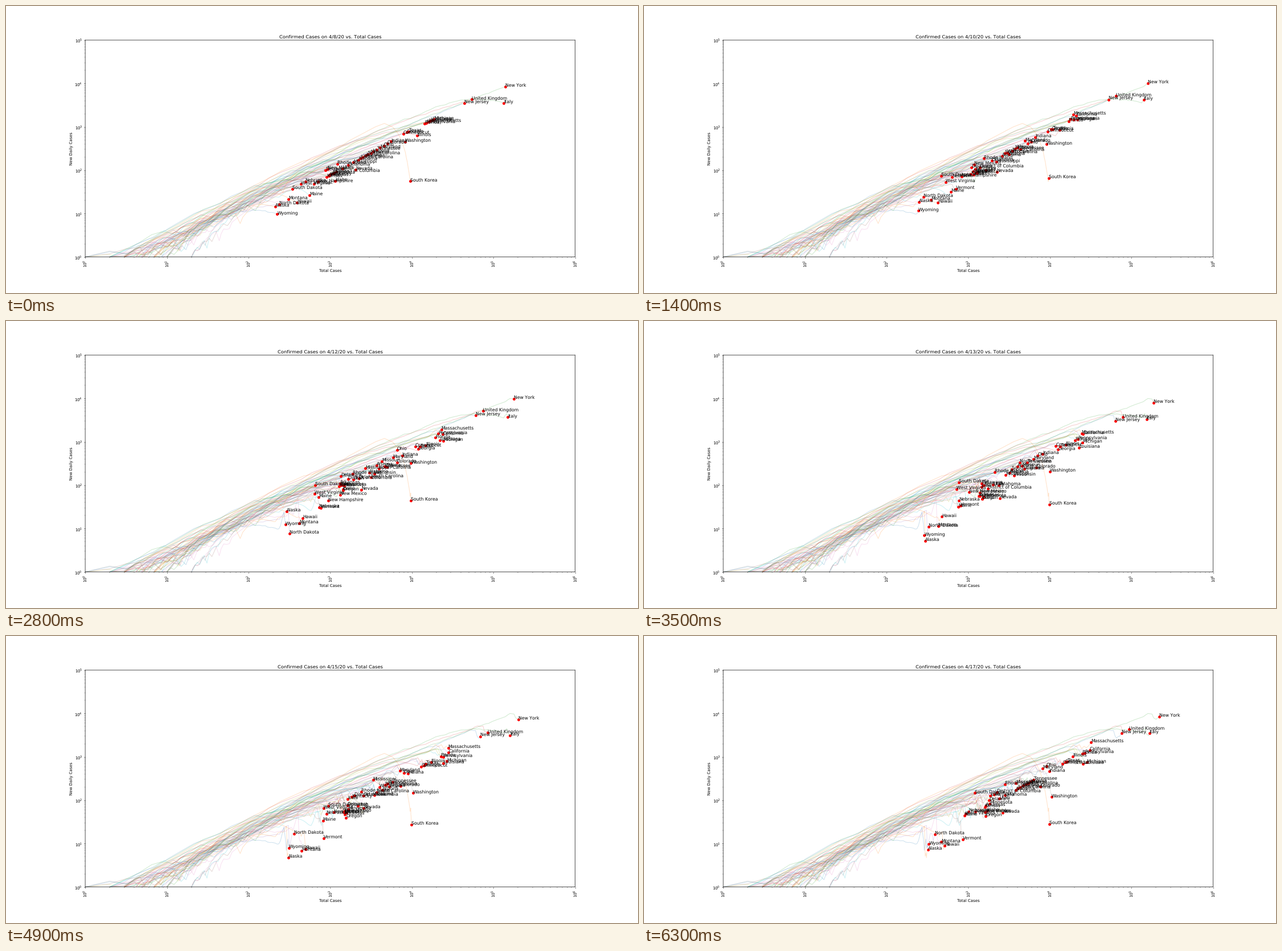
These frames come from a looping animation (1110x505 px, 7000 ms). A matplotlib script:

```python
import numpy as np
import matplotlib.pyplot as plt
from matplotlib.animation import FuncAnimation

W, H, DPI = 1110, 505, 50
N_DAYS, INTERVAL = 10, 700
LEFT, RIGHT, BOTTOM, TOP = 139.1, 999.6, 441.5, 60.0  # plot edges in pixels

plt.rcParams.update({
    "font.family": "DejaVu Sans",
    "font.size": 10.09,
    "text.hinting": "none",
    "text.kerning_factor": 6,
    "axes.linewidth": 1.0,
    "figure.subplot.left": LEFT / W,
    "figure.subplot.right": RIGHT / W,
    "figure.subplot.bottom": 1 - BOTTOM / H,
    "figure.subplot.top": 1 - TOP / H,
})

rng = np.random.default_rng(12)

# Ordered by total cases on the first day.
NAMES = """Alaska, Wyoming, North Dakota, Montana, South Dakota, Hawaii,
West Virginia, Nebraska, Maine, Vermont, New Hampshire, Delaware, Kansas,
New Mexico, Arkansas, Iowa, Kentucky, Minnesota, Oregon, Idaho,
District of Columbia, Rhode Island, Utah, Oklahoma, Mississippi, Nevada,
Alabama, South Carolina, Wisconsin, Arizona, North Carolina, Missouri,
Virginia, Tennessee, Maryland, Ohio, Colorado, Indiana, Connecticut,
Washington, Georgia, Texas, South Korea, Illinois, Florida, Pennsylvania,
Massachusetts, Louisiana, California, Michigan, New Jersey, United Kingdom,
Italy, New York""".replace("\n", " ").split(", ")
ABROAD = ["South Korea", "Italy", "United Kingdom"]
COLOR_ORDER = sorted(set(NAMES) - set(ABROAD)) + ABROAD

# Decades above or below the common trend on the first day.
LEVEL = {
    0.17: "South Dakota, West Virginia, Nebraska, Delaware, New Mexico, Rhode Island",
    -0.2: "Wyoming, Hawaii, Maine, Idaho, Nevada, Washington, Illinois",
    -0.36: "Italy",
    -1.17: "South Korea",
}
# Change of the daily count over the loop, in decades.
CHANGE = {
    0.6: "South Dakota",
    0.22: "Illinois, Iowa, Kentucky, Maine, Maryland, Massachusetts, "
          "Mississippi, Ohio, Rhode Island, District of Columbia",
    -0.3: "Alaska, Hawaii, Montana, Nevada, New Mexico, Oregon, Colorado, "
          "Louisiana, Michigan, South Korea",
    -0.58: "Vermont, Washington",
}


def log_x(px):
    return 6 * (np.asarray(px) - LEFT) / (RIGHT - LEFT)


def log_y(py):
    return 5 * (BOTTOM - np.asarray(py)) / (BOTTOM - TOP)


def lookup(groups, name):
    return next((v for v, names in groups.items() if name in names.split(", ")), 0)


def total_at(rank):
    ranks = [0, 2, 3, 10, 11, 21, 24, 32, 37, 38, 42, 44, 49, 50, 51, 52, 53]
    px = [473, 480, 496, 548, 561, 582, 610, 645, 676, 698, 710, 735, 752,
          805, 818, 874, 877]
    return log_x(np.interp(rank, ranks, px))


def trend(x):
    px = [473, 548, 620, 660, 700, 752, 818, 877]
    py = [353, 309, 270, 248, 224, 199, 164, 142]
    return np.interp(x, log_x(px), log_y(py))


def shown_days(name, x):
    """Log totals and log daily counts for the days of the loop."""
    t = np.linspace(0, 1, N_DAYS)
    noise = rng.normal(0, 0.02 + 0.3 * np.exp((2 - x) / 0.8), N_DAYS)
    ys = trend(x) + lookup(LEVEL, name) + lookup(CHANGE, name) * t
    ys += 0.07 * np.sin(2 * np.pi * t) + noise * np.sin(np.pi * t)
    added = np.cumsum(np.r_[0, 10 ** ys[1:]])
    return np.log10(10 ** x + added), ys


def history(end_x, end_y):
    """Earlier growth: steady ratio with noisy small counts, then a slowdown."""
    start = np.log10(rng.choice([1, 2, 2, 2, 3, 3, 3, 4, 5, 7, 10, 20]))
    ratio, end_ratio = rng.normal(-0.57, 0.11), end_y - end_x
    # The further the final drop, the later and steeper it comes.
    power = max(3, 9.5 * (ratio - end_ratio) ** 2)
    pts, x, wobble = [], start, 0
    while x < end_x - 0.01:
        slow = ((x - start) / (end_x - start)) ** power
        lead_in = (-start - ratio) * np.exp((start - x) / 0.5)
        g = ratio + (end_ratio - ratio) * slow + lead_in + wobble * (1 - slow)
        pts.append((x, x + g))
        x += np.log10(1 + 10 ** np.clip(g, -1.6, 0))
        size = 0.02 + 0.18 * np.exp(-x / 1.1)
        wobble = 0.6 * wobble + size * (0.6 - rng.exponential())
    return pts


fig, ax = plt.subplots(figsize=(W / DPI, H / DPI), dpi=DPI)
ax.set(xscale="log", yscale="log", xlim=(1, 1e6), ylim=(1, 1e5),
       xlabel="Total Cases", ylabel="New Daily Cases")
ax.tick_params(axis="x", rotation=90)
for spine in ax.spines.values():
    spine.set_snap(False)
title = ax.set_title("")

places = []
for rank, name in enumerate(NAMES):
    xs, ys = shown_days(name, total_at(rank))
    past = history(xs[0], ys[0])
    path = 10 ** np.vstack([past, np.column_stack([xs, ys])])
    color = f"C{COLOR_ORDER.index(name) % 10}"
    line, = ax.plot([], [], color=color, alpha=0.22, lw=1.5)
    dot, = ax.plot([], [], "ro", ms=6, zorder=2.4)
    label = ax.text(1, 1, name, fontsize=11.1)
    places.append((path, len(past), line, dot, label))


def update(day):
    title.set_text(f"Confirmed Cases on 4/{8 + day}/20 vs. Total Cases")
    for path, past, line, dot, label in places:
        now = past + day
        line.set_data(*path[:now + 1].T)
        dot.set_data(*path[now:now + 1].T)
        label.set_position(path[now])


anim = FuncAnimation(fig, update, frames=N_DAYS, interval=INTERVAL,
                     init_func=lambda: None, repeat=True, repeat_delay=0)
plt.show()
```
